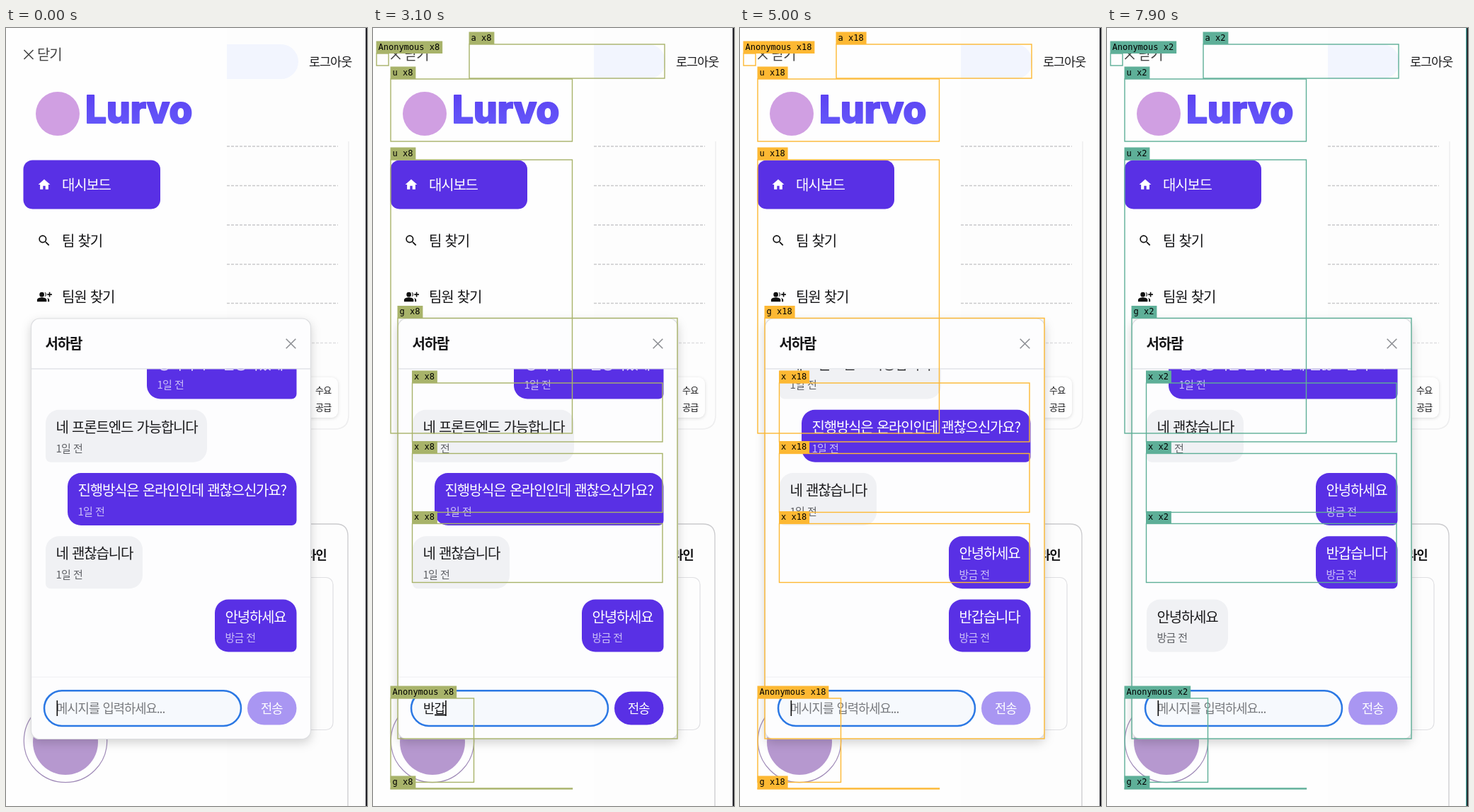
An HTML page that plays this animation: 510x1098 px, repeating every 8000 ms.

```html
<!DOCTYPE html>
<html lang="ko">
<head>
<meta charset="utf-8">
<title>Chat panel</title>
<style>
  html, body { margin: 0; width: 100%; height: 100%; overflow: hidden; background: #fdfdfd; }
  svg { display: block; width: 100vw; height: 100vh; }
  text {
    font-family: "Noto Sans CJK KR", "Noto Sans CJK JP", "Noto Sans CJK", sans-serif;
    letter-spacing: -.06em; word-spacing: .05em; white-space: pre;
  }
  .tag { font-family: "DejaVu Sans Mono", monospace; font-size: 12px; letter-spacing: 0; word-spacing: 0; }
  .logo { font: 800 53px Inter, sans-serif; letter-spacing: 0; }
  .panel { filter: drop-shadow(0 5px 7px rgba(0, 0, 0, .17)); }
  .soft { filter: drop-shadow(0 1px 2px rgba(0, 0, 0, .14)); }
</style>
</head>
<body>
<svg viewBox="0 0 510 1098" preserveAspectRatio="none">
  <defs>
    <linearGradient id="ink" x1="0" y1="0" x2="0" y2="1">
      <stop offset="0" stop-color="#5a3df0"/><stop offset="1" stop-color="#665cfb"/>
    </linearGradient>
    <clipPath id="list"><rect x="36" y="481.5" width="394" height="434.5"/></clipPath>
  </defs>
  <g id="page"></g>
  <g id="messages" clip-path="url(#list)"></g>
  <g id="composer"></g>
  <g id="overlay"></g>
</svg>
<script>
const LOOP = 8000, STEP = 100;
const VIOLET = '#5930e5', PITCH = 89.25;
const $ = id => document.getElementById(id);

// Text placed by its left edge and the visual middle of its line
const text = (x, mid, str, size, fill, extra = '') =>
  `<text x="${x}" y="${mid + size * .385}" font-size="${size}" fill="${fill}" ${extra}>${str}</text>`;

const box = (x0, y0, x1, y1, r, fill, extra = '') =>
  `<rect x="${x0}" y="${y0}" width="${x1 - x0}" height="${y1 - y0}" rx="${r}" fill="${fill}" ${extra}/>`;

const line = (d, color, width, extra = '') =>
  `<path d="${d}" fill="none" stroke="${color}" stroke-width="${width}" ${extra}/>`;

const cross = (x, y, r, color, width) =>
  line(`M${x - r} ${y - r}l${2 * r} ${2 * r}m0 ${-2 * r}l${-2 * r} ${2 * r}`, color, width);

const icon = (x, y, scale, fill, d) =>
  `<path transform="translate(${x} ${y}) scale(${scale}) translate(-12 -12)" fill="${fill}" d="${d}"/>`;

const HOME = 'M10 20v-6h4v6h5v-8h3L12 3 2 12h3v8z';
const SEARCH = 'M15.5 14h-.79l-.28-.27A6.47 6.47 0 0 0 16 9.5 6.5 6.5 0 1 0 9.5 16c1.61 0 3.09-.59 4.23-1.57l.27.28v.79l5 4.99L20.49 19zm-6 0a4.5 4.5 0 1 1 0-9 4.5 4.5 0 0 1 0 9z';
const GROUP = 'M8 12a4 4 0 1 0 0-8 4 4 0 0 0 0 8zm0 1c-3 0-8 1.3-8 4v3h16v-3c0-2.7-5-4-8-4zm4.5-1.1a4 4 0 0 0 0-7.8 6 6 0 0 1 0 7.8zm4 2c1 .8 1.6 1.8 1.6 3.1v3h2.4v-3c0-1.5-1.7-2.5-4-3.1zM20 12v-3h-3V7h3V4h2v3h3v2h-3v3z';

function drawPage() {
  const rules = [167, 222.5, 278, 333.5, 388.5, 444.5].map((y, i) =>
    line(`M312 ${y}H469`, '#c9c9cb', 1.3, `stroke-dasharray="4 2" opacity="${i < 5 ? 1 : .55}"`)).join('');

  const backdrop =
    box(0, 0, 510, 1098, 0, '#fdfdfd') +
    box(136, 23, 413, 72, 24.5, '#f2f5fe') +
    text(428, 47, '로그아웃', 17.5, '#1d1d1f') +
    line('M484 160V546Q484 566 464 566H312', '#eeeeef', 1.6) + rules +
    box(390, 493, 469, 550, 9, '#fefefe', 'class="soft"') +
    text(437, 510.5, '수요', 13, '#1d1d1f', 'font-weight="500"') +
    text(437, 534.5, '공급', 13, '#1d1d1f', 'font-weight="500"') +
    line('M300 700H466Q483 700 483 717V1098', '#cbcbce', 1.3) +
    text(452.5, 743.5, '온라인', 17.5, '#151517', 'font-weight="700" text-anchor="end"') +
    box(300, 775.5, 462, 990.5, 10, 'none', 'stroke="#e0e0e3" stroke-width="1.2"') +
    box(508, 0, 510, 1098, 0, '#25252b');

  const drawer =
    box(0, 0, 312, 1098, 0, '#fefefe') +
    cross(32, 37.5, 6.5, '#444', 1.6) +
    text(44, 37.5, '닫기', 20, '#444') +
    '<circle cx="73" cy="121" r="31" fill="#d09fe2"/>' +
    '<text class="logo" x="112" y="134" fill="url(#ink)" stroke="url(#ink)" stroke-width="2" stroke-linejoin="round">Lurvo</text>' +
    box(24.5, 186.5, 218, 255.5, 13, VIOLET) +
    icon(54, 221, .84, '#fff', HOME) + text(79, 221, '대시보드', 20, '#fff') +
    icon(54, 300, .86, '#111', SEARCH) + text(79, 300, '팀 찾기', 20, '#151517') +
    icon(54, 379.5, .84, '#111', GROUP) + text(79, 379.5, '팀원 찾기', 20, '#151517') +
    '<circle cx="84" cy="1006" r="58.7" fill="#fefefe" stroke="#a08bb8" stroke-width="1.2"/>' +
    '<circle cx="84" cy="1008" r="46" fill="#b698cf"/>';

  const panel =
    box(35.5, 410, 430.5, 1003.5, 12, '#fdfdfe', 'stroke="#dcdde0" stroke-width="1.2" class="panel"') +
    text(55.5, 445.5, '서하람', 20, '#151517', 'font-weight="700"') +
    cross(402.5, 445.5, 6.8, '#8b8d92', 1.5) +
    line('M36 481H430', '#e2e4e8', 1.3) + line('M36 916H430', '#f0f0f3', 1.2);

  $('page').innerHTML = backdrop + drawer + panel;
}

// Each message: own side?, inner edge of the bubble, words, age
const MESSAGES = [
  [true, 199, '경력이시고 신청하셨네', '1일 전'],
  [false, 284, '네 프론트엔드 가능합니다', '1일 전'],
  [true, 87, '진행방식은 온라인인데 괜찮으신가요?', '1일 전'],
  [false, 193, '네 괜찮습니다', '1일 전'],
  [true, 295, '안녕하세요', '방금 전'],
  [true, 295, '반갑습니다', '방금 전'],
  [false, 171, '안녕하세요', '방금 전']
];

function bubble([mine, edge, words, age], y) {
  const x0 = mine ? edge : 56, x1 = mine ? 410.5 : edge;
  const R = 19, s = 7, br = mine ? s : R, bl = mine ? R : s, h = 74;
  const d = `M${x0 + R} ${y}H${x1 - R}a${R} ${R} 0 0 1 ${R} ${R}V${y + h - br}a${br} ${br} 0 0 1 ${-br} ${br}` +
    `H${x0 + bl}a${bl} ${bl} 0 0 1 ${-bl} ${-bl}V${y + R}a${R} ${R} 0 0 1 ${R} ${-R}z`;
  return `<path d="${d}" fill="${mine ? VIOLET : '#f0f1f4'}"/>` +
    text(x0 + 14.5, y + 24.5, words, 20, mine ? '#fff' : '#1a1a1c') +
    text(x0 + 14.5, y + 54, age, 15, mine ? '#cbbff7' : '#5f6166');
}

const clamp = v => Math.max(0, Math.min(1, v));
const ease = v => v < .5 ? 2 * v * v : 1 - 2 * (1 - v) ** 2;
const SENT = 3700, REPLY = 7600;

function drawMessages(t) {
  const shown = 5 + (t >= SENT) + (t >= REPLY);
  const scroll = PITCH * (ease(clamp((t - SENT) / 375)) + ease(clamp((t - REPLY) / 300)));
  $('messages').innerHTML = MESSAGES.slice(0, shown)
    .map((m, i) => bubble(m, 449.5 + PITCH * i - scroll)).join('');
}

const TYPE = 2700, CLEAR = 3600;
const DRAFTS = ['ㅂ', '배', 'ㅂ', '바', '반', '반ㄱ', '반가', '반갑', '반값', '반갑스',
  '반갑습', '반갑습ㄴ', '반갑습니', '반갑습닏', '반갑습니다'];

// Number of renders so far, one per key press
function renders(t) {
  if (t >= REPLY) return t < REPLY + STEP ? 1 : 2;
  if (t >= CLEAR) return Math.min(18, 16 + (t - CLEAR) / STEP);
  return Math.max(1, Math.round(2 + (t - 2800) * 13 / 700));
}

function caretOn(t) {
  if (t < TYPE) return t % 500 < 200 || t % 500 >= 400;
  return t < 4100 || (t - 100) % 500 >= 200;
}

function drawComposer(t) {
  const typing = t >= TYPE && t < CLEAR;
  const draft = typing ? DRAFTS[renders(t) - 1] : '';
  const end = 71.5 + draft.length * 15.3;
  const caret = typing || caretOn(t) ? box(end, 949, end + 1.6, 971, 0, '#111') : '';
  const words = typing
    ? text(71, 960, draft, 17.8, '#151517') + box(end - 15, 968.5, end + 1, 970.5, 0, '#151517')
    : text(71, 960, '메시지를 입력하세요...', 17.7, '#77797d');
  $('composer').innerHTML =
    box(54, 935.2, 332, 985, 24.9, '#f6f9fd', 'stroke="#2b78e4" stroke-width="2.5"') + words + caret +
    box(341, 936.5, 410.5, 983.5, 23.5, typing ? VIOLET : '#a996f2') +
    text(360, 960, '전송', 17.7, '#fff');
}

// Outlined regions: name, corners, shared with the page component?
const REGIONS = [
  ['Anonymous', 5, 36, 22, 53],
  ['a', 136, 23, 412, 71],
  ['u', 25, 72, 281.5, 160],
  ['u', 25, 186, 281.5, 572],
  ['g', 35, 409.5, 430, 1003, true],
  ['x', 55.5, 501, 409, 584],
  ['x', 55.5, 600.5, 409, 683.5],
  ['x', 55.5, 699.5, 409, 782.5],
  ['Anonymous', 25, 946, 142.5, 1064.5, true],
  ['g', 25, 1073, 281.5, 1074, true]
];
const TEAL = [82, 174, 160], AMBER = [253, 184, 51], FRESH = '#46a7a0';
const heat = n => `rgb(${TEAL.map((c, i) => Math.round(c + (AMBER[i] - c) * clamp((n - 1) / 14)))})`;

function drawOverlay(t) {
  const active = (t >= TYPE && t < 5300) || t >= REPLY;
  if (!active) { $('overlay').innerHTML = ''; return; }
  const n = renders(t), color = heat(n);
  const paged = t >= CLEAR && t < 4400;
  const alpha = t < REPLY ? clamp(1 - (t - 5000) / 300) : 1;
  const frames = REGIONS.map(([, x0, y0, x1, y1, shared]) =>
    box(x0, y0, x1, y1, 0, 'none', `stroke="${paged && shared ? FRESH : color}" stroke-width="1.4"`));
  const tags = REGIONS.map(([name, x, y, , , shared]) => {
    const label = `${name} x${n}${paged && shared ? ', p' : ''}`;
    return box(x - .5, y - 17.5, x + label.length * 7.22 + 6.5, y, 0, color) +
      `<text class="tag" x="${x + 2.5}" y="${y - 5.5}" fill="#000">${label}</text>`;
  });
  const edge = paged || t >= REPLY ? line('M507.6 0V1098', FRESH, 1.2) : '';
  $('overlay').innerHTML = `<g opacity="${alpha}">${edge}${frames.join('')}${tags.join('')}</g>`;
}

let last = -1;
const start = performance.now();
function tick() {
  const t = Math.floor((performance.now() - start) % LOOP / STEP) * STEP;
  if (t !== last) {
    last = t;
    drawMessages(t);
    drawComposer(t);
    drawOverlay(t);
  }
  requestAnimationFrame(tick);
}

drawPage();
tick();
</script>
</body>
</html>
```
